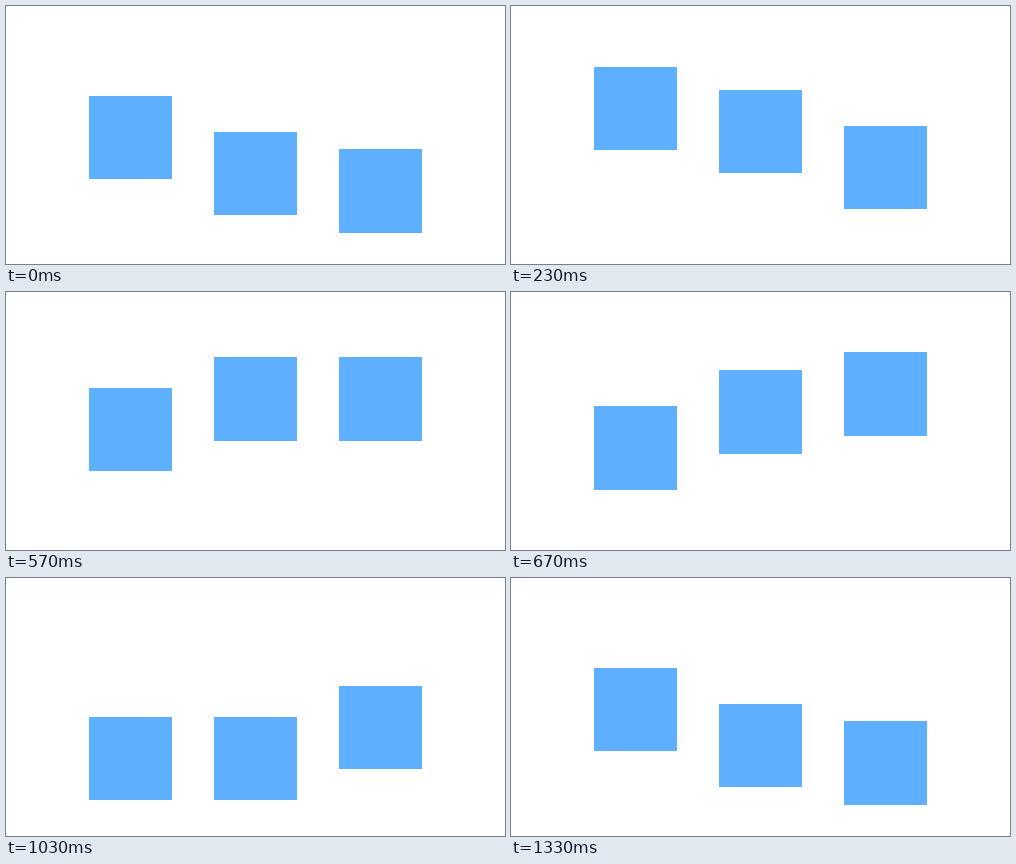
Write an HTML page that moves like this. It is 499x258 px and loops after 1.37 s.

```html
<!DOCTYPE html>
<html lang="en">
<head>
<meta charset="utf-8">
<title>Bouncing squares</title>
<style>
  html, body { margin: 0; width: 100%; height: 100%; overflow: hidden; background: #fff; }
  svg { display: block; width: 499px; height: 258px; }
  rect { fill: #5eb0ff; }
</style>
</head>
<body>
<svg viewBox="0 0 499 258" shape-rendering="crispEdges">
  <rect x="83" width="83"/>
  <rect x="208" width="83"/>
  <rect x="333" width="83"/>
</svg>
<script>
  const LOOP = 1370;   // ms, the closing pose is held for one extra step
  const STEPS = 40;    // steps in one full swing, 30 per second
  const LAG = 6;       // steps between neighbouring squares
  const MID = 101.995, SWING = 41.5, SIZE = 83.23;
  const squares = [...document.querySelectorAll('rect')];

  // Eased swing between -1 and 1, a smoothstep softened with a little sine
  function swing(step) {
    const s = Math.sin(2 * Math.PI * (step - 18) / STEPS);
    const x = Math.asin(s) * 2 / Math.PI;
    return 0.88 * x * (1.5 - 0.5 * x * x) + 0.12 * s;
  }

  function draw(time) {
    const tick = Math.floor((time % LOOP) / 10);
    const step = Math.floor((tick + 0.5) * 0.3);
    squares.forEach((square, i) => {
      const y = MID + SWING * swing(step - LAG * i);
      const top = Math.round(y);
      square.setAttribute('y', top);
      square.setAttribute('height', Math.round(y + SIZE) - top);
    });
  }

  const start = performance.now();
  function loop() {
    draw(performance.now() - start);
    requestAnimationFrame(loop);
  }
  loop();
</script>
</body>
</html>
```
